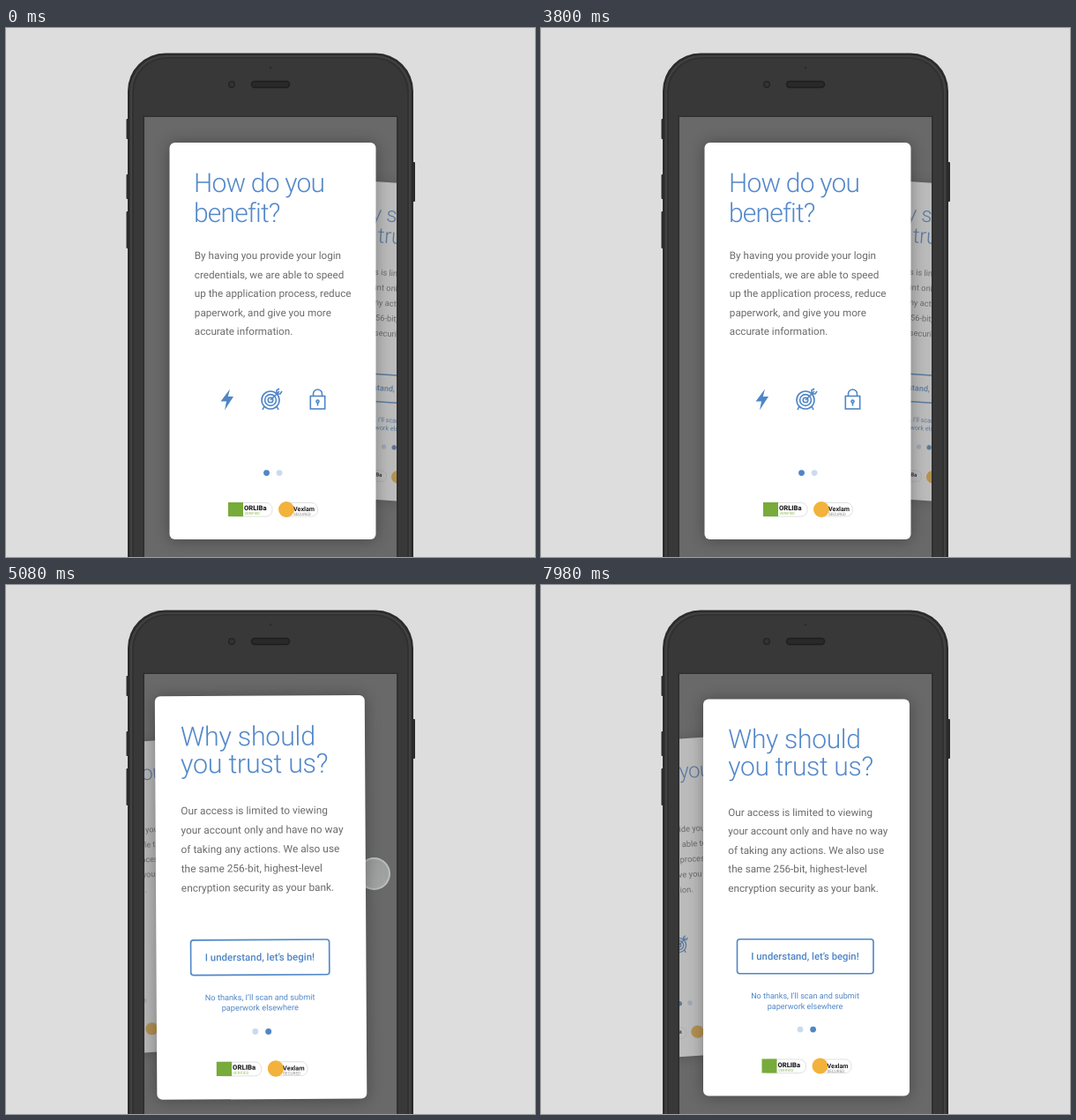
Animation, 600 px wide and 600 px high, one loop 8000 ms. Source, as an HTML page:

```html
<!DOCTYPE html>
<html lang="en">
<head>
<meta charset="utf-8">
<style>
html, body { margin: 0; width: 100%; height: 100%; overflow: hidden; background: #ddd; }
#stage { position: relative; width: 600px; height: 600px; overflow: hidden; }
#phone { position: absolute; left: 0; top: 0; }
#screen { position: absolute; left: 157px; top: 101px; width: 286px; height: 499px; overflow: hidden; background: #696969; }
.card {
  position: absolute; left: -117px; top: -225px; width: 234px; height: 450px;
  background: #fff; border-radius: 6px; box-shadow: 0 1px 18px rgba(0, 0, 0, .33);
}
.card svg { display: block; font-family: Roboto, Inter, sans-serif; text-rendering: geometricPrecision; }
.title { font-size: 30px; font-weight: 300; fill: #5388c9; }
.body { font-size: 11.7px; fill: #6b6b6b; }
.action { font-size: 11.3px; font-weight: 500; fill: #4f86c6; text-anchor: middle; }
.skip { font-size: 9.05px; fill: #4f86c6; text-anchor: middle; }
.line { fill: none; stroke: #4f86c6; stroke-width: 1.6; }
#cursor {
  position: absolute; left: -18.5px; top: -18.5px; width: 37px; height: 37px; box-sizing: border-box;
  border: 2px solid rgba(205, 208, 208, .62); border-radius: 50%;
  background: linear-gradient(rgba(226, 228, 228, .42), rgba(244, 246, 246, .42));
}
</style>
</head>
<body>
<div id="stage">
  <svg id="phone" width="600" height="600">
    <g fill="#2b2b2b">
      <rect x="136.5" y="103" width="4" height="23" rx="1"/>
      <rect x="136.5" y="166" width="4" height="28" rx="1"/>
      <rect x="136.5" y="208" width="4" height="42" rx="1"/>
      <rect x="460" y="152" width="4" height="45" rx="1"/>
    </g>
    <rect x="138" y="28.5" width="324" height="700" rx="43" fill="#2b2b2b"/>
    <rect x="140.5" y="31" width="319" height="700" rx="41" fill="#414141"/>
    <rect x="143" y="33" width="314" height="700" rx="39" fill="#303030"/>
    <rect x="145" y="34.5" width="310" height="700" rx="38" fill="#383838"/>
    <rect x="155" y="99.5" width="290" height="520" fill="#303030"/>
    <rect x="278.5" y="60.5" width="43" height="7" rx="3.5" fill="#292929" stroke="#1e1e1e" stroke-width="1.4"/>
    <circle cx="256" cy="64" r="3.3" fill="#333" stroke="#222" stroke-width="1.3"/>
    <circle cx="300" cy="45" r="1.2" fill="#2c2c2c"/>
  </svg>
  <div id="screen">
    <div class="card" id="benefit"></div>
    <div class="card" id="trust"></div>
  </div>
  <div id="cursor"></div>
</div>
<script>
const byId = id => document.getElementById(id);
const benefit = byId('benefit'), trust = byId('trust'), cursor = byId('cursor');

const text = (cls, x, y, gap, lines, extra = '') => lines.map((s, i) =>
  `<text class="${cls}" x="${x}" y="${y + i * gap}" ${extra}>${s}</text>`).join('');

const label = (x, y, size, weight, fill, s) =>
  `<text x="${x}" y="${y}" font-size="${size}" font-weight="${weight}" fill="${fill}">${s}</text>`;

const dots = active => [-7, 7.6].map((x, i) =>
  `<circle cx="${x}" cy="149.6" r="3.4" fill="${i === active ? '#4f86c6' : '#cbdaef'}"/>`).join('');

const badges = `
  <g fill="#fff" stroke="#d9d9d9" stroke-width=".8">
    <rect x="-50" y="183.5" width="49.5" height="15.5" rx="7"/>
    <rect x="8" y="183.5" width="43" height="15.5" rx="7"/>
  </g>
  <rect x="-50.5" y="183" width="17" height="16" fill="#77ab3a"/>
  <circle cx="15.5" cy="191" r="9" fill="#f2b23c"/>`
  + label(-32.5, 192, 7.6, 800, '#222', 'ORLIBa') + label(-32, 197, 4.2, 400, '#8fbb55', 'VERIFIED')
  + label(23.5, 193, 7.2, 700, '#222', 'Vexlam') + label(23.5, 198, 4.6, 400, '#888', 'SECURED');

const icons = `
  <path transform="translate(-51.5 66.5)" fill="#4f86c6" d="M3-12-7.5 2H-1L-3 12 7-3.5H.8Z"/>
  <g class="line" transform="translate(-2.5 67)">
    <circle r="10"/><circle r="6.4"/><circle r="2.8"/>
    <path d="M0 0 10-10M7-7V-11L10-13M7-7H11L13-10M-7 7-9 11M7 7 9 11"/>
  </g>
  <g class="line" transform="translate(51 69)">
    <rect x="-8.2" y="-6.5" width="16.4" height="14.5"/>
    <path d="M-5-6.5V-9A5 5 0 0 1 5-9V-6.5M0 1V4.5"/><circle cy="-.4" r="1.5"/>
  </g>`;

const fill = (card, content) => {
  card.innerHTML = `<svg width="234" height="450" viewBox="-117 -225 234 450">${content}${badges}</svg>`;
};

fill(benefit,
  text('title', -89.5, -169, 33.5, ['How do you', 'benefit?'], 'letter-spacing="-.8"') +
  text('body', -88.7, -93, 21.5, [
    'By having you provide your login', 'credentials, we are able to speed',
    'up the application process, reduce', 'paperwork, and give you more', 'accurate information.'
  ]) + icons + dots(0));

fill(trust,
  text('title', -88.7, -169.5, 30.5, ['Why should', 'you trust us?'], 'letter-spacing="-.3"') +
  text('body', -88.7, -93, 21.5, [
    'Our access is limited to viewing', 'your account only and have no way',
    'of taking any actions. We also use', 'the same 256-bit, highest-level', 'encryption security as your bank.'
  ]) +
  '<rect class="line" x="-78.5" y="47.3" width="154.5" height="39" rx="3"/>' +
  text('action', -1.5, 70.5, 0, ['I understand, let’s begin!']) +
  text('skip', -1.5, 114.5, 11.5, ['No thanks, I’ll scan and submit', 'paperwork elsewhere']) + dots(1));

const LOOP = 8000, SWAP = 4830;
const clamp = v => Math.max(0, Math.min(1, v));
const mix = (a, b, k) => a + (b - a) * k;
const ease = k => k * k * (3 - 2 * k);

// Underdamped spring from 0 to 1; s in seconds.
function spring(s) {
  if (s <= 0) return 0;
  const decay = 9.9, freq = 12.6;
  return 1 - Math.exp(-decay * s) * (Math.cos(freq * s) + decay / freq * Math.sin(freq * s));
}

// away: 0 = in front, 1 = resting behind; side: -1 left, 1 right.
function pose(card, x, y, away, side) {
  card.style.transform = `translate(${x - 157}px, ${y - 101}px) rotate(${side * 3.8 * away}deg) scale(${1 - .2 * away})`;
  card.style.opacity = Math.min(1, 1 - .45 * away);
}

// time, x, y
const path = [[1560, 392, 412], [1720, 388, 411], [2080, 388, 411], [2880, 396, 330], [3800, 397, 328.5],
  [4600, 417, 327], [6300, 417, 327], [7980, 356, 333]];

function cursorAt(t) {
  const i = path.findIndex(p => p[0] > t);
  if (i === 0) return path[0].slice(1);
  if (i < 0) return path[path.length - 1].slice(1);
  const [t0, x0, y0] = path[i - 1], [t1, x1, y1] = path[i];
  const raw = (t - t0) / (t1 - t0), k = t0 < 6000 ? ease(raw) : raw;
  return [mix(x0, x1, k), mix(y0, y1, k)];
}

function draw(now) {
  const t = now % LOOP, p = spring((t - SWAP) / 1000);
  pose(benefit, mix(302.5, 155, p), 355, p, -1);
  pose(trust, mix(442, 301, p), mix(356, 354.5, p), 1 - p, 1);
  benefit.style.zIndex = t > SWAP ? 1 : 2;
  trust.style.zIndex = t > SWAP ? 2 : 1;

  const [x, y] = cursorAt(t);
  cursor.style.transform = `translate(${x}px, ${y}px)`;
  cursor.style.opacity = clamp((t - 1000) / 400) * mix(1, .8, clamp((t - 7500) / 480));
  requestAnimationFrame(draw);
}
draw(0);
</script>
</body>
</html>
```
